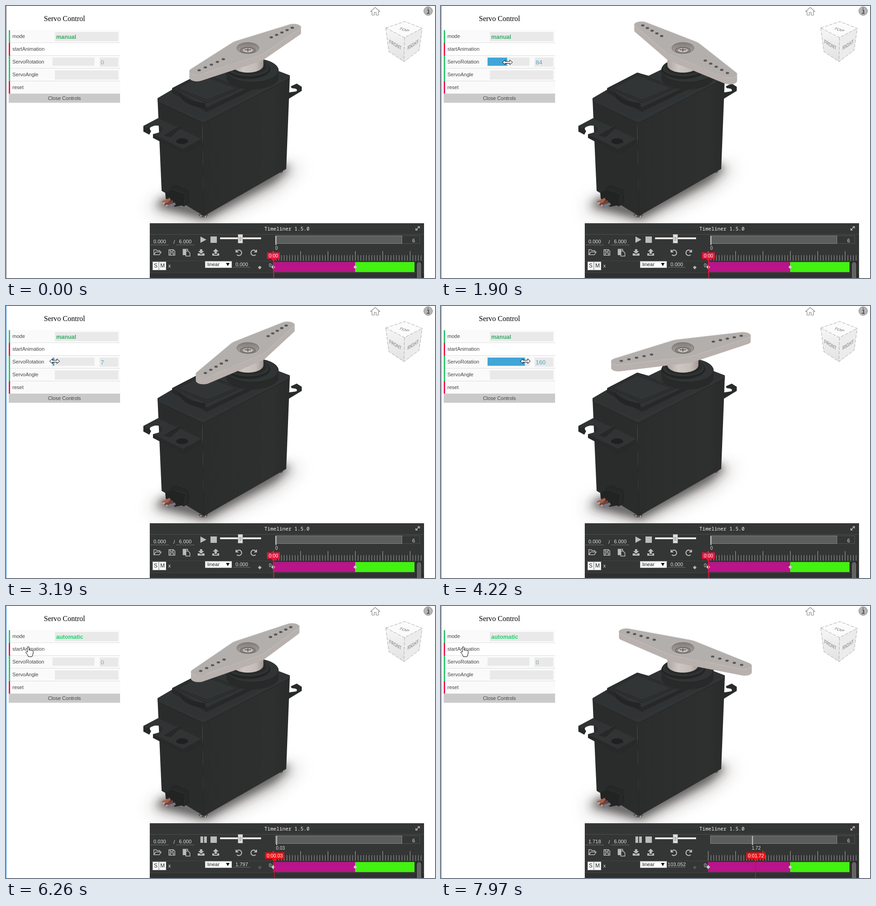
Animation of 940x596 px, one loop 8 s. Source, as an HTML page:

```html
<!DOCTYPE html>
<html lang="en">
<head>
<meta charset="utf-8">
<title>Servo Control</title>
<style>
html, body { margin: 0; width: 100%; height: 100%; overflow: hidden; background: #fff; }
svg { display: block; width: 940px; height: 596px; }
text { font: 11px "Liberation Sans", Arial, sans-serif; fill: #444; white-space: pre; }
.title { font: 16px "Liberation Serif", Times, serif; fill: #000; }
.mode { font-size: 12.5px; font-weight: bold; }
.num { font-size: 13px; }
.mid { text-anchor: middle; }
.light text { fill: #ddd; }
.light .mono { font: 11px "Noto Sans Mono", "DejaVu Sans Mono", monospace; fill: #f2f2f2; }
.light .dark { fill: #222; }
.light .big { font-size: 12px; }
.dots { stroke: #aaa; stroke-dasharray: 1 1; }
.icon { fill: none; stroke: #bcbcbc; stroke-width: 1.5; }
.solid { fill: #bcbcbc; }
.cube text { font-size: 12px; font-weight: bold; fill: #999; }
.edge { fill: none; stroke: #222424; }
</style>
</head>
<body>
<svg viewBox="0 0 940 596">
  <defs>
    <filter id="blur" x="-40%" y="-60%" width="180%" height="220%"><feGaussianBlur stdDeviation="10"/></filter>
    <filter id="haze" x="-40%" y="-60%" width="180%" height="220%"><feGaussianBlur stdDeviation="18"/></filter>
    <linearGradient id="rightFace"><stop stop-color="#2b2d2d"/><stop offset=".8" stop-color="#2e3030"/><stop offset="1" stop-color="#292b2b"/></linearGradient>
    <linearGradient id="hubFill"><stop stop-color="#aea6a2"/><stop offset=".35" stop-color="#cec6c2"/><stop offset=".75" stop-color="#c4bcb8"/><stop offset="1" stop-color="#a19995"/></linearGradient>
    <linearGradient id="wellFill" x2="0" y2="1"><stop stop-color="#837d7a"/><stop offset="1" stop-color="#aca6a3"/></linearGradient>
    <linearGradient id="cubeFill" x2="0" y2="1"><stop stop-color="#fafafa"/><stop offset="1" stop-color="#e2e2e2"/></linearGradient>
  </defs>
  <rect width="940" height="596" fill="#fff"/>
  <rect id="border" width="1" height="596"/>

  <!-- servo body -->
  <path d="M310 446L345 420 434 456 612 350 646 352 590 402 440 478Z" fill="#8a8481" opacity=".5" filter="url(#haze)"/>
  <path d="M328 438L350 418 434 440 606 346 622 354 590 384 437 468Z" fill="#353130" opacity=".8" filter="url(#blur)"/>
  <path d="M616 190L636 187Q640 183 634 181L626 180 624 176 637 170 648 177V186L620 203Z" fill="#292b2b"/>
  <g fill="#55514f"><circle cx="602" cy="361" r="5"/><path d="M421 456h22l-4 7h-13z"/></g>
  <g fill="#c9c4c1"><circle cx="600" cy="363" r="1.500"/><circle cx="427" cy="460" r="1.500"/><circle cx="437" cy="461" r="1.500"/></g>
  <path d="M332 202L430 250 434 460 341 405Z" fill="#2a2c2c"/>
  <path d="M430 250L622 153 614 357 434 460Z" fill="url(#rightFace)"/>
  <path d="M332 202L366 182 430 147 455 153 482 140 500 125 596 142 622 152V158L432 257 332 208Z" fill="#303333"/>
  <path d="M332 208L432 257 622 159M431 256L434 460" class="edge"/>
  <path d="M332 208L431 251 621 155" class="edge" style="stroke:#383b3b"/>
  <path d="M364 180L430 146 455 153 482 140 500 125 597 143V156L440 232 364 190Z" fill="#272929"/>
  <path d="M364 180L430 146 455 153 482 140 500 125 597 143V148L440 222Z" fill="#313434"/>
  <path d="M483 141V157A57 26 0 0 0 597 157V141Z" fill="#282a2a"/>
  <ellipse cx="540" cy="141" rx="57" ry="26" fill="#313434" stroke="#232525"/>
  <path d="M368 180L430 147 514 180 441 212Z" fill="#2e3131" stroke="#222424"/>
  <path d="M377 180L430 152 504 180 441 206Z" fill="#323535" stroke="#252727"/>
  <path d="M381 186V198Q394 219 437 225V212Q394 207 381 186Z" fill="#242626"/>
  <path d="M381 186Q394 207 437 212" class="edge" style="stroke:#3a3d3d"/>
  <ellipse cx="531" cy="139" rx="48" ry="21" fill="#242626"/>
  <ellipse cx="531" cy="136" rx="46" ry="19" fill="#303333" stroke="#1f2121"/>
  <ellipse cx="531" cy="134" rx="40" ry="16" fill="#282a2a"/>

  <!-- mounting ear, cable -->
  <path d="M301 263L333 246 428 291 427 303 390 325 372 315 322 289V281L336 277C350 270 340 260 326 262 316 264 312 268 318 274L314 282 301 275Z" fill="#282a2a"/>
  <path d="M301 263L333 246 428 291 388 313 322 281 336 277C350 270 340 260 326 262L308 268Z" fill="#313434"/>
  <ellipse cx="386" cy="297" rx="13" ry="7" fill="#1f2121"/>
  <path d="M375 301Q386 306 397 300" class="edge" style="stroke:#3a3d3d"/>
  <path d="M344 283L381 261 384 267 360 288Z" fill="#272929"/>
  <path d="M344 283L381 261" class="edge" style="stroke:#3b3e3e"/>
  <path d="M362 399L372 393 399 404 401 430 390 439 363 425Z" fill="#262828" stroke="#1f2121"/>
  <path d="M349 410L364 402 394 412 390 436 370 440 350 422Z" fill="#222424"/>
  <path d="M364 402L394 412 390 434" class="edge" style="stroke:#313434"/>
  <g fill="none" stroke-width="6">
    <path d="M343 431L360 423" stroke="#a8604b"/><path d="M348 436L366 428" stroke="#70443d"/>
    <path d="M354 440L371 433" stroke="#777783"/><path d="M343 433l5 -2M350 438l4 -2" stroke="#d0a89a" stroke-width="3"/>
  </g>

  <!-- horn -->
  <path d="M496 100V130A34 16 0 0 0 564 130V100Z" fill="url(#hubFill)"/>
  <path id="side" fill="#b8b1ae"/>
  <path id="top" fill="#b3afad" stroke="#c6c1be" stroke-width=".8"/>
  <ellipse cx="530" cy="92" rx="24" ry="12" fill="url(#wellFill)" stroke="#6f6967"/>
  <ellipse cx="530" cy="97" rx="17" ry="6.500" fill="#8a8481" stroke="#625c5a"/>
  <ellipse cx="530" cy="97" rx="11" ry="4.200" fill="#c8c2bf"/>
  <path d="M523 96h14M530 93v7" stroke="#665f5c" stroke-width="2"/>
  <g id="holes" fill="#5c5755"></g>

  <!-- view cube, home, info -->
  <g class="cube">
    <path d="M874 34L912 49 905 97 872 122 839 100 832 48Z" fill="url(#cubeFill)"/>
    <path d="M874 34L912 49 873 69 832 48Z" fill="#fbfbfb"/>
    <path d="M873 69L912 49 905 97 872 122Z" fill="#ececec"/>
    <path d="M832 48L874 34 912 49 905 97 872 122 839 100ZL873 69 912 49M873 69L872 122" fill="none" stroke="#aaa" stroke-dasharray="7 3"/>
    <text class="mid" transform="matrix(.86 .26 -.6 .5 870 54)">TOP</text>
    <text class="mid" transform="matrix(.64 .38 0 1 853 89)">FRONT</text>
    <text class="mid" transform="matrix(.66 -.42 0 1 892 89)">RIGHT</text>
  </g>
  <path d="M799 12L809 3 819 12H816V20H811V14H807V20H802V12Z" fill="#fff" stroke="#888" stroke-width="1.200"/>
  <circle cx="925" cy="11" r="9.500" fill="#b5b5b5" stroke="#888"/>
  <path d="M923 9h3v7M922 16h6M924 5h2" fill="none" stroke="#555" stroke-width="2"/>

  <!-- control panel -->
  <text class="title" x="83" y="33">Servo Control</text>
  <g id="rows"></g>
  <g fill="#e9e9e9">
    <rect x="107" y="57" width="139" height="20"/><rect x="102" y="113" width="92" height="18"/>
    <rect x="205" y="113" width="41" height="20"/><rect x="107" y="141" width="139" height="20"/>
  </g>
  <text id="mode" class="mode" x="110" y="72"></text>
  <rect id="fill" x="102" y="113" height="18" fill="#41a5d8"/>
  <text id="value" class="num" x="207.500" y="128"></text>
  <rect x="6" y="192" width="244" height="20" fill="#cacaca"/>
  <text class="mid" x="128" y="206">Close Controls</text>

  <!-- timeline -->
  <g class="light">
    <rect x="315" y="476" width="601" height="120" fill="#343635"/>
    <path d="M315 500.500H916" stroke="#4c4e4d"/>
    <text class="mono mid" x="615.500" y="492">Timeliner 1.5.0</text>
    <path d="M899 490L905 484M902 483.500h4v4M898 487v4h4" class="icon" stroke-width="1"/>
    <text id="time" x="323" y="520"></text><text x="367" y="521">/</text><text x="379" y="520">6.000</text>
    <path class="dots" d="M317 523.500H356M373 523.500H413M498 572.500H536"/>
    <path id="play" class="solid" d="M426 505L439 512 426 519Z"/>
    <path id="pause" class="solid" d="M426 505h6v14h-6zM434 505h6v14h-6z"/>
    <path class="solid" d="M448 505h14v14h-14z"/>
    <rect x="469" y="507" width="90" height="4" fill="#ece7e3"/>
    <rect x="508.500" y="500.500" width="10" height="19" fill="#dedede" stroke="#999"/>
    <path d="M511 507.500h5M511 510.500h5M511 513.500h5" stroke="#777"/>
    <rect x="590.500" y="503.500" width="316" height="17" fill="#343635" stroke="#505251"/>
    <rect x="590.500" y="503.500" width="277" height="17" fill="#5c5e5d" stroke="#868887"/>
    <text x="890" y="518">6</text>
    <rect id="scrub" y="504" width="2" height="20" fill="#c9c9c9"/>
    <text id="scrubText" y="534" style="font-size:10px"></text>

    <g class="icon">
      <path d="M324 545V534h5l2 2h6v3M324 545l4 -6h12l-4 6z"/>
      <path d="M357 534h10l3 3v9h-13zM360 534v4h6v-4M360 546v-5h7v5"/>
      <path d="M393 545h-5v-12h10v4M394 537h5l4 4v7h-9z"/><path class="solid" d="M389 534h5v11h-5z"/>
      <path d="M504 534v5h5M505 538A6 6 0 1 1 506 545" stroke-width="2"/>
      <path d="M549 534v5h-5M548 538A6 6 0 1 0 547 545" stroke-width="2"/>
    </g>
    <g class="solid">
      <path d="M425 533h5v4h4l-6.500 6 -6.500 -6h4zM420 542h4l3.500 3 3.500 -3h4v5h-15z"/>
      <path d="M457 543v-5h-4l6.500 -6 6.500 6h-4v5zM452 542h4v3h7v-3h4v5h-15z"/>
    </g>
    <path id="minor" stroke="#9a9c9b"/><path id="major" stroke="#a8aaa9"/>

    <path d="M315 584.500H916M315 558.500H585" stroke="#424443"/>
    <rect x="315" y="585" width="601" height="11" fill="#2f3130"/>
    <rect x="321.500" y="560.500" width="13" height="18" fill="#fff" stroke="#aaa"/>
    <rect x="335.500" y="560.500" width="15" height="18" fill="#fff" stroke="#aaa"/>
    <text class="dark big" x="324" y="573">S</text><text class="dark big" x="338" y="573">M</text>
    <text x="355.500" y="573">x</text>
    <rect x="436.500" y="559.500" width="58" height="14" fill="#fff" stroke="#aaa"/>
    <text class="dark" x="441" y="570">linear</text><path d="M482 563h8l-4 7z" fill="#111"/>
    <text id="track" class="mid" x="516.500" y="570"></text>
    <path id="key" d="M552 573l4 -4 4 4 -4 4z"/>
    <text x="576" y="572" style="font-size:10px">0:</text>
    <rect x="585" y="561" width="180" height="22" fill="#b9148a"/>
    <rect x="765" y="561" width="130" height="22" fill="#42f210"/>
    <path d="M581 572l4.500 -4.500 4.500 4.500 -4.500 4.500zM761 572l4.500 -4.500 4.500 4.500 -4.500 4.500z" fill="#ccc" stroke="#777" stroke-width=".6"/>
    <rect x="898" y="560" width="14" height="36" fill="#222423"/>
    <path d="M900 596V567q0 -6 5 -6t5 6V596z" fill="#626463"/>
    <g id="head">
      <rect id="headLine" y="554" height="42"/>
      <path d="M-5 553H6L.5 560z"/><rect id="headBox" y="540" height="14"/>
      <text id="headText" class="mid" y="550.500" style="font-size:10.500px;fill:#fff"></text>
    </g>
  </g>

  <path id="resize" d="M-11 0L-5 -5V-2H5V-5L11 0 5 5V2H-5V5Z" fill="#fff" stroke="#000"/>
  <path id="hand" d="M-4 -10q2 -2 3.500 0V-3q1 -1.500 3 0 1.500 -1 3 .5 2 -1 3 1V3Q8 7 6 11H-2Q-3 7 -8 1.500 -7 -1 -4 1Z" fill="#fff" stroke="#000"/>
</svg>
<script>
const $ = id => document.getElementById(id);
const LOOP = 8000, DRAG = 1060, AUTO = 6260, STEP = 45;
const GREEN = '#1ed36f', PINK = '#e6194f';

// Pointer path: time, x, y
const pointer = [
  [40, 196, 124], [500, 92, 123], [830, 116, 123], [880, 117, 123], [1060, 117, 122],
  [1270, 103, 121], [1490, 109.7, 121], [1850, 141, 123], [2360, 188.4, 127],
  [2680, 194, 127], [2880, 194, 126], [3190, 106.6, 121], [3480, 71, 121],
  [3630, 71, 121], [3800, 103, 121], [4220, 184.8, 121], [4320, 188, 121],
  [4550, 188, 121], [5150, 103, 121], [5340, 77, 121], [5390, 73, 121], [5520, 51, 100]
];

function pointerAt(t) {
  const i = pointer.findIndex(k => k[0] > t);
  if (i < 1) return (i ? pointer[pointer.length - 1] : pointer[0]).slice(1);
  const [a, b] = [pointer[i - 1], pointer[i]];
  const f = (t - a[0]) / (b[0] - a[0]);
  return [1, 2].map(n => a[n] + (b[n] - a[n]) * f);
}

// Horn plan: a hub disc and two tip discs, joined by tangents
const HUB = .29, TIP = .11, REACH = 1.03;
const tangent = Math.acos((HUB - TIP) / REACH);
const plan = [];
function arc(cx, r, from, to, n) {
  for (let i = 0; i <= n; i++) {
    const a = from + (to - from) * i / n;
    plan.push([cx + r * Math.cos(a), r * Math.sin(a)]);
  }
}
arc(REACH, TIP, -tangent, tangent, 20);
arc(0, HUB, tangent, Math.PI - tangent, 6);
arc(-REACH, TIP, Math.PI - tangent, Math.PI + tangent, 20);
arc(0, HUB, Math.PI + tangent, 2 * Math.PI - tangent, 6);

// Tilted plane with mild perspective around the hub centre
function project([u, v], angle) {
  const c = Math.cos(angle), s = Math.sin(angle);
  const p = u * c - v * s, q = u * s + v * c;
  const x = 103 * p - 105 * q, y = -47 * p - 48 * q, k = 1 + y * .001;
  return [530 + x * k, 92 + y * k, k];
}
const pt = (x, y) => x.toFixed(2) + ' ' + y.toFixed(2);

const holes = [];
for (const side of [-1, 1]) for (let i = 0; i < 5; i++) {
  const e = document.createElementNS('http://www.w3.org/2000/svg', 'ellipse');
  e.setAttribute('rx', 3.7);
  e.setAttribute('ry', 2.3);
  $('holes').append(e);
  holes.push([e, side * (.51 + i * .12)]);
}

function drawHorn(deg) {
  const angle = deg * Math.PI / 180;
  const pts = plan.map(p => project(p, angle));
  $('top').setAttribute('d', 'M' + pts.map(p => pt(p[0], p[1])).join('L') + 'Z');
  let d = '';
  pts.forEach((a, i) => {
    const b = pts[(i + 1) % pts.length];
    if (b[0] <= a[0]) return;
    d += `M${pt(a[0], a[1])}L${pt(b[0], b[1])} ${pt(b[0], b[1] + 13.5 * b[2])} ${pt(a[0], a[1] + 13.5 * a[2])}Z`;
  });
  $('side').setAttribute('d', d);
  for (const [e, u] of holes) {
    const [x, y] = project([u, 0], angle);
    e.setAttribute('cx', x);
    e.setAttribute('cy', y);
  }
}

const labels = ['mode', 'startAnimation', 'ServoRotation', 'ServoAngle', 'reset'];
$('rows').innerHTML = labels.map((name, i) => {
  const y = 53 + 28 * i;
  return `<rect x="6" y="${y}" width="244" height="28" fill="${i === 1 ? '#fff' : '#fafafa'}"/>
    <rect x="6" y="${y + 27}" width="244" height="1" fill="#dedede"/>
    <rect x="6" y="${y}" width="3" height="28" fill="${i === 1 || i === 4 ? PINK : '#2dc66f'}"/>
    <text x="14" y="${y + 17}">${name}</text>`;
}).join('');

let minor = '', major = '';
for (let i = 0; i < 55; i++) {
  const x = 585.5 + 6 * i;
  if (i % 10) minor += `M${x} 546V558`;
  else major += `M${x} 537V558`;
}
$('minor').setAttribute('d', minor);
$('major').setAttribute('d', major);

const show = (id, on) => $(id).setAttribute('visibility', on ? 'visible' : 'hidden');
const move = (id, x, y) => $(id).setAttribute('transform', `translate(${x} ${y})`);

function draw(t) {
  const auto = t >= AUTO;
  // The player refreshes in discrete steps
  const clock = auto ? .02995 + Math.floor((t - AUTO) / STEP + .02) * .04441 : 0;
  const [x, y] = pointerAt(t);
  const dragging = t >= DRAG && t < 5390;
  const value = dragging ? Math.max(0, Math.min(180, Math.round((x - 103) / 92 * 180))) : 0;
  const angle = auto ? clock * 60 : value;

  drawHorn(angle);
  $('border').setAttribute('fill', t < DRAG ? '#6e6878' : '#2f86d6');
  $('mode').textContent = auto ? 'automatic' : 'manual';
  $('mode').style.fill = auto ? GREEN : '#38ab68';
  $('fill').setAttribute('width', value / 180 * 92);
  $('value').textContent = value;
  $('value').style.fill = value ? '#4ba3cc' : '#8ba3b1';

  $('time').textContent = clock.toFixed(3);
  $('track').textContent = (auto ? angle : 0).toFixed(3);
  show('play', !auto);
  show('pause', auto);
  $('key').setAttribute('fill', auto ? '#555756' : '#b5b5b5');
  const scrub = 590.5 + clock * 53;
  $('scrub').setAttribute('x', scrub);
  $('scrubText').setAttribute('x', scrub - .5);
  $('scrubText').textContent = auto ? clock.toFixed(2) : '0';

  const wide = auto ? 42 : 28;
  move('head', 585.5 + clock * 60, 0);
  $('head').setAttribute('fill', auto ? '#f80c12' : '#e8143c');
  $('headBox').setAttribute('x', -wide / 2 + (auto ? 1.5 : .5));
  $('headBox').setAttribute('width', wide);
  $('headText').setAttribute('x', auto ? 1.5 : .5);
  $('headText').textContent = auto ? '0:0' + clock.toFixed(2) : '0:00';
  $('headLine').setAttribute('width', auto ? 1.5 : 2);
  $('headLine').setAttribute('fill', auto ? '#c4123a' : '#e8143c');

  show('resize', t >= 40 && t < 5440);
  show('hand', t >= 5440);
  move('resize', x, y);
  move('hand', x, y);
}

const start = performance.now();
function tick() {
  draw((performance.now() - start) % LOOP);
  requestAnimationFrame(tick);
}
tick();
</script>
</body>
</html>
```
